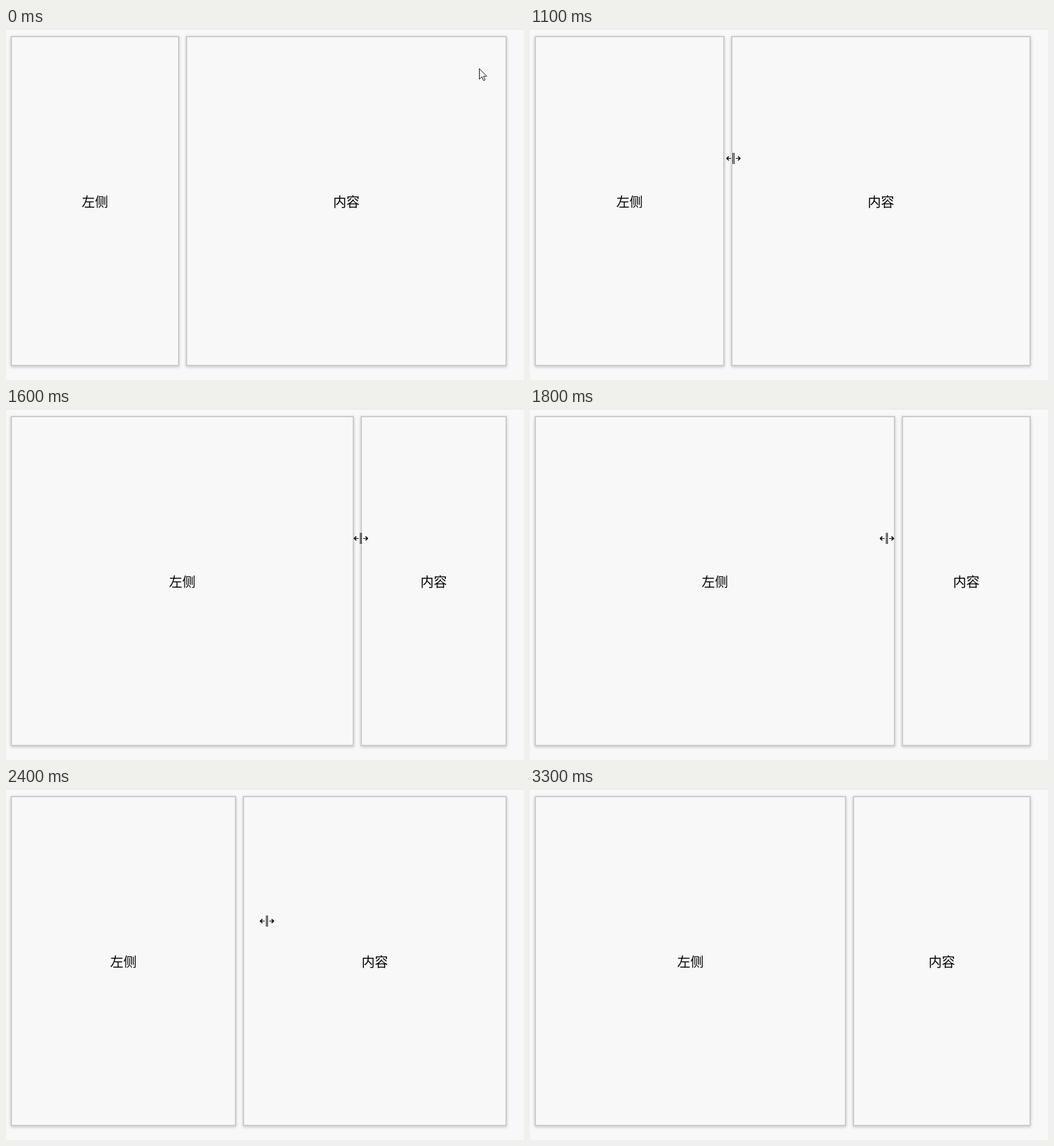
Recreate the animation shown at these times as an HTML page. Size 783 by 533 pixels, loop 3.6 s.

```html
<!DOCTYPE html>
<html lang="zh">
<head>
<meta charset="utf-8">
<style>
  html, body { margin: 0; width: 100%; height: 100%; overflow: hidden; background: #f8f8f8; }
  .rule { position: absolute; top: 1px; width: 100%; height: 1px; background: #dedede; }
  .panel {
    position: absolute; top: 12px; height: 500px; box-sizing: border-box;
    border: 2px solid #ccc;
    box-shadow: 0 2px 4px rgba(0, 0, 0, .15), 0 0 6px rgba(0, 0, 0, .05);
    font: 350 20px/498px "Noto Sans CJK SC", "Noto Sans CJK", sans-serif;
    color: #000; text-align: center; white-space: nowrap;
  }
  svg { position: absolute; left: 0; top: 0; overflow: visible; }
</style>
</head>
<body>
<div class="rule"></div>
<div class="panel" id="left">左侧</div>
<div class="panel" id="right">内容</div>
<svg width="783" height="533">
  <path id="arrow" d="M.5 .5V16.5L4.3 12.9L6.9 18.6L9.2 17.6L6.7 12.1H11.6Z"
        fill="#fff" stroke="#15152a"/>
  <g id="resize" fill="none" stroke="#000">
    <path d="M-.5 0V18M2.5 0V18" stroke="#fff" stroke-width="2"/>
    <path d="M-.5 0V17M1.5 0V17M-3 8.5H-9M4 8.5H10"/>
    <path d="M-6.5 5.5L-9.5 8.5L-6.5 11.5M7.5 5.5L10.5 8.5L7.5 11.5" stroke-width="1.6"/>
  </g>
</svg>
<script>
  const LOOP = 3600, TICK = 100;
  const LEFT = 7, RIGHT = 757, GAP = 10;
  const DRAG_START = 1000, LAG = 29; // the divider trails the pointer by LAG ms

  const [left, right, arrow, resize] =
    ['left', 'right', 'arrow', 'resize'].map(id => document.getElementById(id));

  const linear = k => k;
  const smooth = k => k * k * (3 - 2 * k);
  const easeIn = power => k => k ** power;
  const easeOut = power => k => 1 - (1 - k) ** power;

  // Each key is a pose to reach, with the easing that leads into it.
  const key = (time, x, y, ease = linear) => ({ time, x, y, ease });

  const approach = [key(0, 715, 61), key(500, 273, 199, easeOut(1.7))];
  const drag = [
    key(600, 264, 189),
    key(700, 262, 189),
    key(DRAG_START, 262, 189),
    key(1400, 443, 189),
    key(1730, 560, 189, easeOut(1.7)),
    key(2171, 251, 192, smooth),
    key(2310, 251, 192),
    key(2400, 394, 193),
    key(2900, 478.4, 200, easeOut(2.4))
  ];
  const leave = [key(3000, 494, 206), key(3200, 753, 77, easeIn(1.7))];

  function sample(path, time) {
    const i = path.findIndex(pose => pose.time >= time);
    if (i <= 0) return path.at(i);
    const a = path[i - 1], b = path[i];
    const k = b.ease((time - a.time) / (b.time - a.time));
    return { x: a.x + (b.x - a.x) * k, y: a.y + (b.y - a.y) * k };
  }

  function place(cursor, path, time) {
    const visible = time >= path[0].time && time <= path.at(-1).time;
    const { x, y } = sample(path, time);
    cursor.style.display = visible ? '' : 'none';
    cursor.setAttribute('transform', `translate(${Math.round(x)} ${Math.round(y)})`);
  }

  function draw() {
    const time = Math.floor(performance.now() % LOOP / TICK) * TICK;
    const split = Math.round(sample(drag, Math.max(DRAG_START, time - LAG)).x);
    left.style.left = LEFT + 'px';
    left.style.width = split - LEFT + 'px';
    right.style.left = split + GAP + 'px';
    right.style.width = RIGHT - split - GAP + 'px';
    place(arrow, time < DRAG_START ? approach : leave, time);
    place(resize, drag, time);
    requestAnimationFrame(draw);
  }
  draw();
</script>
</body>
</html>
```
